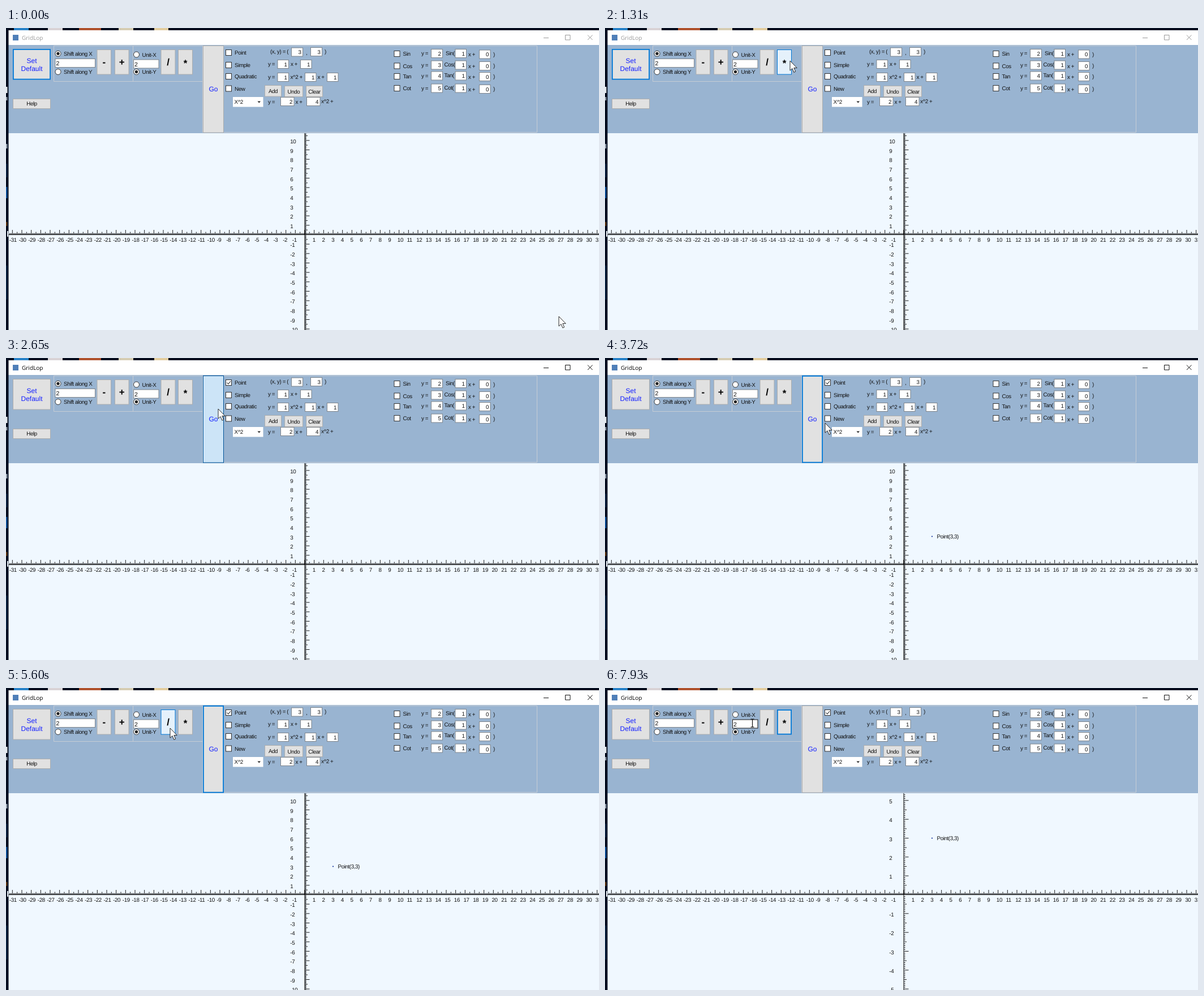
An HTML page for the animation above (8 s loop, 1048 px wide and 534 px high).

```html
<!DOCTYPE html>
<html lang="en">
<head>
<meta charset="utf-8">
<title>Graph plotter</title>
<style>
  html, body { margin: 0; width: 100%; height: 100%; overflow: hidden; background: #030d1f; }
  svg { display: block; width: 1048px; height: 534px; }
  text { font: 9.8px "Liberation Sans", Arial, sans-serif; letter-spacing: -0.4px; fill: #111;
         white-space: pre; text-rendering: geometricPrecision; }
  .big { font-size: 12px; letter-spacing: 0; fill: #1420ff; }
  .sign { font-size: 17px; font-weight: bold; letter-spacing: 0; fill: #000; }
  .value { font-size: 10.5px; letter-spacing: 0; }
  .title { font: 10px "Open Sans", sans-serif; letter-spacing: 0; }
</style>
</head>
<body>
<svg id="stage" viewBox="0 0 1048 534"></svg>
<script>
const LOOP = 8000, STEP = 77;
const ORIGIN = { x: 528, y: 365.5 }, UNIT = 50 / 3;
const PLOT_1 = 2650, PLOT_2 = 6680, ACTIVATE = 2010;
const BLUE = '#0078d7', GRID = '#c6ccd5';
const stage = document.getElementById('stage');

function set(el, attrs) {
  for (const key in attrs) el.setAttribute(key, attrs[key]);
  return el;
}
function add(tag, attrs, parent = stage) {
  return parent.appendChild(set(document.createElementNS('http://www.w3.org/2000/svg', tag), attrs));
}
function show(el, on) { el.style.display = on ? '' : 'none'; }
function fillRect(x, y, width, height, fill) {
  return add('rect', { x, y, width, height, fill });
}
function stroke(d, color = '#000', width = 1, parent = stage) {
  return add('path', { d, fill: 'none', stroke: color, 'stroke-width': width }, parent);
}
function label(str, x, y, cls = '', anchor = 'start', parent = stage) {
  const el = add('text', { x, y, class: cls, 'text-anchor': anchor }, parent);
  el.textContent = str;
  return el;
}

// Boxes keep their outer size whatever the border width
function paint(el, fill, color, border = 1) {
  const [x, y, w, h] = el.area;
  set(el, { x: x + border / 2, y: y + border / 2, width: w - border, height: h - border,
            fill, stroke: color, 'stroke-width': border });
}
function box(x, y, w, h, fill, color, hover) {
  const el = add('rect', {});
  Object.assign(el, { area: [x, y, w, h], base: [fill, color], hover });
  paint(el, fill, color);
  return el;
}
function button(x, y, w, h, str, cls, textY) {
  const el = box(x, y, w, h, '#e1e1e1', '#adadad', ['#e5f1fb', BLUE]);
  str.split('\n').forEach((line, i) => label(line, x + w / 2, textY + i * 14, cls, 'middle'));
  return el;
}
function field(x, y, w, value) {
  const el = box(x, y, w, 16, '#fff', '#7f858c', ['#fff', '#171717']);
  if (value !== undefined) label(value, x + w - 3.5, y + 11.8, '', 'end');
  return el;
}
function check(x, y, str) {
  label(str, x + 16, y + 9.4);
  return box(x, y, 11, 11, '#fff', '#333', ['#fff', BLUE]);
}
function radio(x, y, str, on) {
  add('circle', { cx: x, cy: y, r: 5, fill: '#fff', stroke: '#333' });
  if (on) add('circle', { cx: x, cy: y, r: 2.7, fill: '#222' });
  label(str, x + 10, y + 3.7);
}

// Desktop edge
[[14, 26, '#2a83c8'], [74, 26, '#d9d3d6'], [129, 39, '#b0532f'], [199, 26, '#d6cdb4'], [262, 25, '#e3cda0']]
  .forEach(([x, w, color]) => fillRect(x, 0, w, 4, color));
[[104, 11, '#dfe4ea'], [122, 6, '#8e98a5'], [205, 8, '#8e98a5'], [240, 24, '#0b2140'], [281, 20, '#0d4c93'],
 [343, 7, '#5b3413'], [420, 60, '#07203e']]
  .forEach(([y, h, color]) => fillRect(0, y, 2.5, h, color));
fillRect(2, 359, 2, 10, '#e8ecf0');

// Window frame
fillRect(4.5, 4, 1044, 26, '#fff');
fillRect(4.5, 30, 1044, 156, '#99b4d1');
fillRect(4.5, 186, 1044, 348, '#f0f8ff');
fillRect(12, 12, 10, 10, '#4f7fb8');
const title = label('GridLop', 28, 20.7, 'title');
const frameIcons = stroke('M950 17.5h9M988.5 12.5h8.5v8.5h-8.5zM1028 12.5l8.5 8.5m0 -8.5l-8.5 8.5');
stroke('M84 31.5H938.5V184.5H347.5V31.5M84.5 31V94.5H347M224.5 31V94', GRID);

// Left controls
const setDefault = button(12, 37, 67, 54.5, 'Set\nDefault', 'big', 62);
button(12, 125, 67, 18, 'Help', '', 137.3);
radio(92, 45.3, 'Shift along X', true);
radio(92, 77.5, 'Shift along Y');
field(86.5, 54, 71.5);
label('2', 88.5, 66, 'value');
const minus = button(160.5, 38, 25.5, 44.5, '-', 'sign', 66);
const plus = button(192, 38, 25.5, 44.5, '+', 'sign', 66);
radio(230.5, 47, 'Unit-X');
radio(230.5, 77.5, 'Unit-Y', true);
const unitField = field(225, 55.5, 45.5);
label('2', 227, 67.7, 'value');
const slash = button(273.5, 38, 26, 44.5, '/', 'sign', 66);
const star = button(304, 38, 26, 44.5, '*', 'sign', 67.5);
const go = button(348, 31, 37, 154.5, 'Go', 'big', 112.3);

// Function list
const pointCheck = check(388, 38, 'Point');
const tick = stroke('M390.5 43.5l2.3 2.5l4.2 -5', '#222', 1.1);
check(388, 60, 'Simple');
check(388, 80, 'Quadratic');
check(388, 101.5, 'New');
label('(x, y) = (', 467, 45.3);
field(504, 34.5, 21, 3);
label(',', 530, 47);
field(538, 34, 21, 3);
label(')', 563, 45.3);
label('y =', 463, 67);
field(479.5, 56, 20.5, 1);
label('x +', 503, 67);
field(520, 56, 20.5, 1);
label('y =', 463, 90.3);
field(479.5, 79, 20.5, 1);
label('x^2 +', 502.5, 90);
field(528, 79, 20.5, 1);
label('x +', 550.5, 90);
field(567, 79, 20.5, 1);
button(457, 101, 30, 20.5, 'Add', '', 114.8);
button(492, 102, 33, 20, 'Undo', '', 115.8);
button(530, 102, 30, 20, 'Clear', '', 115.8);
fillRect(401, 122, 53.5, 17.5, '#fff');
label('X^2', 403.5, 134);
add('path', { d: 'M444.5 129.5h5.5l-2.75 3z', fill: '#222' });
label('y =', 463, 133.5);
field(485, 122, 24.5, 2);
label('x +', 511.5, 133.5);
field(531, 122, 24.5, 4);
label('x^2 +', 557, 133.3);

[['Sin', 40, 37], ['Cos', 61.5, 57.5], ['Tan', 80, 76.5], ['Cot', 101, 98.5]].forEach(([name, y, top], i) => {
  check(685.5, y, name);
  label('y =', 734, top + 11);
  field(751, top, 21, i + 2);
  label(name + '(', i ? 774.5 : 777, top + 10.7);
  field(793.5, top, 20.5, 1);
  label('x +', 817, top + 13);
  field(836, top + 1.5, 20.5, 0);
  label(')', 861, top + 12.5);
});

// Chart
stroke(`M4.5 ${ORIGIN.y}H1048M${ORIGIN.x} 186V534`, '#111');
const ticks = stroke('', '#111', 0.95);
const labelsX = add('g', {});
const labelsY = [1, 2].map(scale => {
  const group = add('g', {});
  for (let n = -11; n <= 10; n++) {
    const y = ORIGIN.y - n * UNIT * scale;
    if (n && y > 190 && y < 540) label(n, 502.3, y + 5.3, '', 'start', group);
  }
  return group;
});
for (let n = -31; n <= 31; n++)
  if (n) label(n, ORIGIN.x + n * UNIT - (n < 0 ? 5.5 : 2.8), 377.5, '', 'start', labelsX);
const point = add('g', {});
add('circle', { cx: ORIGIN.x + 3 * UNIT, cy: 0, r: 1.1, fill: '#10309a' }, point);
label('Point(3,3)', 586.5, 3.4, '', 'start', point);

// Rulers are drawn right, left, up, down until the given length is used up
function tickPath(length, scaleY) {
  let d = '';
  for (const [dx, dy, reach] of [[1, 0, 520], [-1, 0, 523], [0, -1, 179], [0, 1, 169]]) {
    const gap = UNIT / 10 * (dy ? scaleY : 1);
    const end = Math.min(reach, length);
    for (let k = 0; k * gap <= end; k++) {
      const size = k % 10 === 0 ? 8.5 : k % 5 === 0 ? 5 : 2.7;
      const x = ORIGIN.x + dx * k * gap, y = ORIGIN.y + dy * k * gap;
      d += `M${x.toFixed(2)} ${y.toFixed(2)}` + (dx ? `v${-size}` : `h${size}`);
    }
    length -= end;
    if (length <= 0) break;
  }
  return d;
}

let drawn = '';
function drawChart(length, scale, hasPoint) {
  const key = [length, scale, hasPoint].join();
  if (key === drawn) return;
  drawn = key;
  const done = length === Infinity;
  set(ticks, { d: length > 0 ? tickPath(length, scale) : '' });
  show(labelsX, done);
  labelsY.forEach((group, i) => show(group, done && scale === i + 1));
  show(point, done && hasPoint);
  set(point, { transform: `translate(0 ${ORIGIN.y - 3 * UNIT * scale})` });
}

// Pointer
const arrow = add('path', {
  d: 'M0 0V17.2L4 13.6L6.9 20.3L9.7 19L6.8 12.6H12.2Z', fill: '#fff', stroke: '#111', 'stroke-width': 0.9
});
const beam = stroke('M-3 -7h2.3l.7 .7l.7 -.7h2.3M0 -6.5V6.5M-3 7h2.3l.7 -.7l.7 .7h2.3', '#000', 1.1);

// Start, end, number of steps, way points
const MOVES = [
  [70, 610, 8, [800, 400], [590, 230], [365, 120], [208, 103]],
  [760, 1150, 6, [290, 70], [322, 66]],
  [1310, 1460, 3, [327, 58], [343, 62], [408, 71]],
  [1640, 1860, 5, [414, 60], [395, 45]],
  [2010, 2480, 7, [395, 45], [395, 45], [392, 60], [384, 76], [378, 86], [375, 90], [375, 90]],
  [2650, 3200, 8, [375, 90], [375, 90], [380, 93], [388, 98]],
  [3720, 3720, 1, [389, 115]],
  [3797, 4490, 10, [300, 95], [262, 80], [245, 66], [262, 63], [285, 65]],
  [4680, 4810, 3, [250, 64]],
  [5040, 5600, 8, [262, 68], [280, 66], [288, 69], [290, 71]],
  [6210, 6210, 1, [312, 66]],
  [6680, 7220, 8, [312, 66], [312, 66], [287, 70], [275, 74], [266, 76], [258, 77], [252, 78], [250, 77]],
  [7380, 7700, 5, [254, 66], [257, 54]],
  [7930, 7930, 1, [260.5, 62]]
];

function pointerAt(t) {
  let from = [977, 510];
  for (const [start, end, steps, ...way] of MOVES) {
    if (t < start) break;
    const gap = steps > 1 ? (end - start) / (steps - 1) : 1;
    const step = Math.min(steps, Math.floor((t - start) / gap + 1e-6) + 1);
    const path = [from, ...way];
    const at = step / steps * way.length;
    const i = Math.min(Math.floor(at + 1e-9), way.length - 1);
    from = [0, 1].map(axis => path[i][axis] + (path[i + 1][axis] - path[i][axis]) * (at - i));
  }
  return from;
}

const controls = [setDefault, minus, plus, slash, star, go, unitField, pointCheck];
function hit(el, [px, py]) {
  const [x, y, w, h] = el.area;
  return px >= x && px < x + w && py >= y && py < y + h;
}

function render(t) {
  const second = t >= PLOT_2;
  const phase = t < PLOT_1 ? -1 : Math.floor((t - (second ? PLOT_2 : PLOT_1)) / STEP);
  const plotting = phase >= 1 && phase < 7;
  const scale = second && phase >= 1 ? 2 : 1;
  drawChart(plotting ? (phase - 1) * 227 : Infinity, scale, second || phase >= 7);

  const pos = pointerAt(t);
  const clicked = second ? star : go;
  const focus = t < ACTIVATE ? setDefault : t < PLOT_1 ? null : clicked;
  const pressed = phase === 0 ? clicked
    : t >= ACTIVATE && t < ACTIVATE + STEP ? pointCheck : null;
  const hovered = plotting ? clicked : controls.find(el => hit(el, pos));
  for (const el of controls) {
    if (el === pressed) paint(el, '#cce4f7', '#005499');
    else if (el === hovered) paint(el, ...el.hover);
    else if (el === focus) paint(el, el.base[0], BLUE, 1.8);
    else paint(el, ...el.base);
  }

  const active = t >= ACTIVATE;
  title.style.fill = active ? '#000' : '#999';
  set(frameIcons, { stroke: active ? '#111' : '#999' });
  show(tick, t >= ACTIVATE + STEP);

  const typing = hit(unitField, pos);
  show(arrow, !typing);
  show(beam, typing);
  set(typing ? beam : arrow, { transform: `translate(${pos})` });
}

const begin = performance.now();
function frame() {
  render((performance.now() - begin) % LOOP);
  requestAnimationFrame(frame);
}
frame();
</script>
</body>
</html>
```
